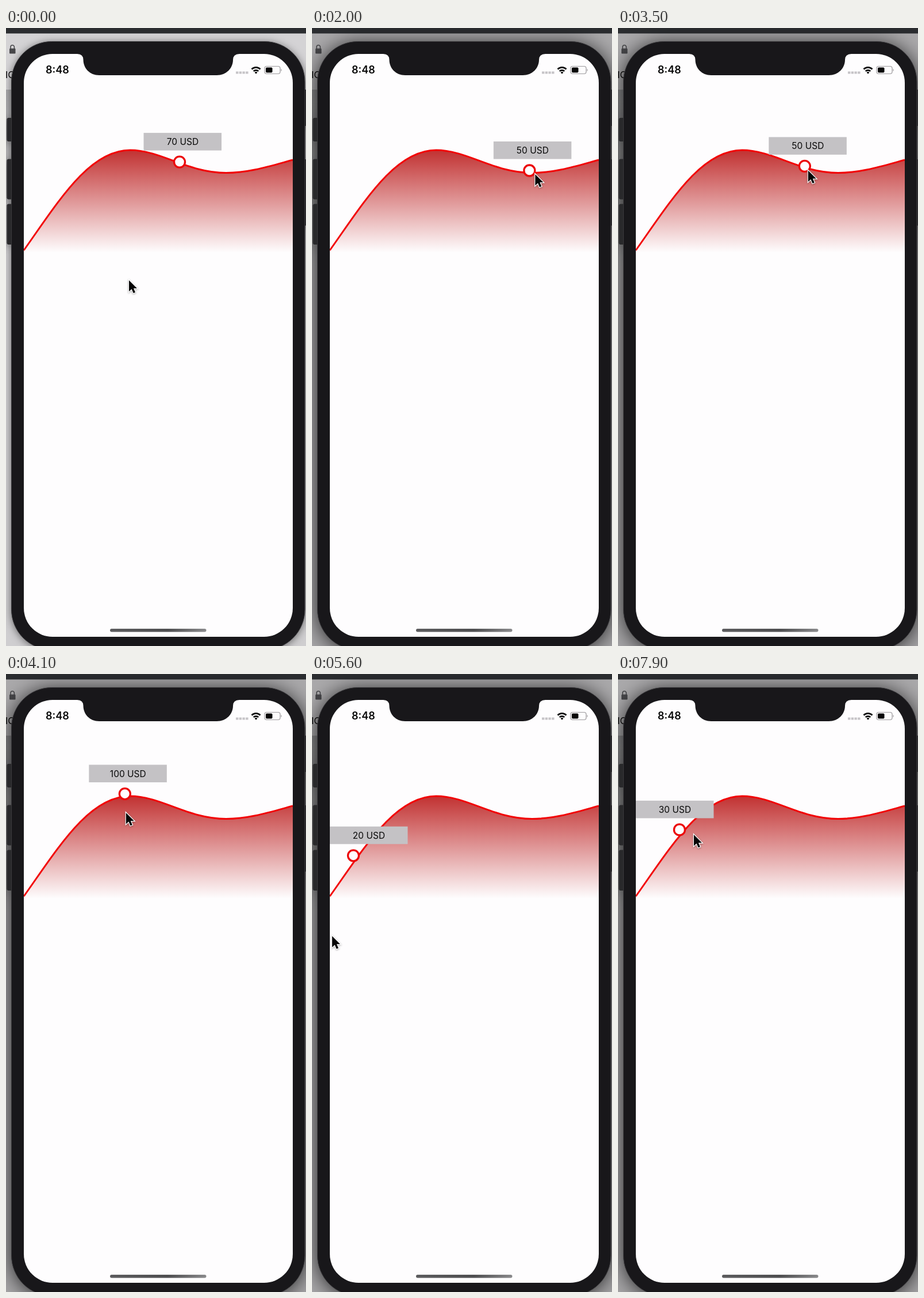
Recreate the animation shown at these times as an HTML page. Size 522 by 1073 pixels, loop 8 s.

```html
<!DOCTYPE html>
<html lang="en">
<head>
<meta charset="utf-8">
<title>Chart drag</title>
<style>
  html, body { margin: 0; width: 100%; height: 100%; overflow: hidden; }
  svg { display: block; width: 100vw; height: 100vh; }
  text { font-family: Inter, "Open Sans", sans-serif; fill: #080808; }
  #shade { opacity: 0; }
  #phone { filter: drop-shadow(0 2px 7px rgba(0, 0, 0, .5)); }
  .focus #shade { opacity: .2; }
  .focus #phone { filter: drop-shadow(0 3px 17px rgba(0, 0, 0, .75)); }
  #pointer { filter: drop-shadow(0 1.5px 1.5px rgba(0, 0, 0, .35)); }
</style>
</head>
<body>
<svg id="stage" viewBox="0 0 522 1073">
  <defs>
    <linearGradient id="area" gradientUnits="userSpaceOnUse" x1="0" y1="211" x2="0" y2="390">
      <stop offset="0" stop-color="#c13030"/>
      <stop offset="1" stop-color="#c13030" stop-opacity="0"/>
    </linearGradient>
    <linearGradient id="page" x2="0" y2="1">
      <stop offset="0" stop-color="#a9a9ab"/>
      <stop offset=".3" stop-color="#cfced0"/>
    </linearGradient>
    <linearGradient id="home">
      <stop offset="0" stop-color="#5c5c5e"/>
      <stop offset=".6" stop-color="#4e4e50"/>
      <stop offset="1" stop-color="#8a8a8c"/>
    </linearGradient>
    <clipPath id="screen"><rect x="31" y="45" width="468" height="1012" rx="50"/></clipPath>
  </defs>

  <!-- desktop behind the phone -->
  <rect y="107" width="522" height="966" fill="url(#page)"/>
  <rect width="522" height="107" fill="#d4d3d5"/>
  <rect id="shade" width="522" height="1073"/>
  <rect width="522" height="9.5" fill="#2b2d30"/>
  <path d="M8 36v-3a3.2 3.2 0 0 1 6.4 0v3" fill="none" stroke="#47474a" stroke-width="1.6"/>
  <rect x="6" y="35.5" width="10.5" height="9" rx="1.2" fill="#47474a"/>
  <text x="-1" y="87" font-size="16">IC</text>

  <!-- phone -->
  <g id="phone">
    <g fill="#29292b">
      <rect x="1.5" y="156" width="14" height="41" rx="3"/>
      <rect x="1.5" y="227.5" width="14" height="70" rx="3"/>
      <rect x="1.5" y="305.5" width="14" height="70.5" rx="3"/>
      <rect x="514" y="107" width="12" height="63"/>
      <rect x="514" y="228" width="12" height="115"/>
    </g>
    <rect x="9.5" y="23.5" width="510.5" height="1056" rx="70" fill="#18171a" stroke="#3a393c"/>
  </g>
  <rect x="31" y="45" width="468" height="1012" rx="50" fill="#fefdfe"/>
  <path d="M124 44H406V45Q395 45.5 395 55C395 70 383 82 367 82H162C146 82 134.5 70 134.5 55Q134.5 45.5 124 45Z" fill="#18171a"/>

  <!-- status bar -->
  <text x="69" y="79.3" font-size="18" font-weight="600">8:48</text>
  <path d="M400 77.5h22" stroke="#c6c4c7" stroke-width="4" stroke-dasharray="4.4 1.3"/>
  <g fill="none" stroke="#080808" stroke-width="2.7">
    <path d="M427.5 71.5a10.5 10.5 0 0 1 15 0M430.8 75a6 6 0 0 1 8.4 0"/>
    <path d="M433 77.2L435 79.2 437 77.2Q435 75.8 433 77.2Z" fill="#080808" stroke-width="1"/>
  </g>
  <rect x="450" y="66.5" width="27" height="13" rx="3.5" fill="none" stroke="#9b999c" stroke-width="1.2"/>
  <rect x="452" y="68.5" width="11.5" height="9" rx="1.8" fill="#080808"/>
  <path d="M478.5 70.5q2.5 2.5 0 5z" fill="#9b999c"/>
  <rect x="181" y="1043" width="167.5" height="5.5" rx="2.75" fill="url(#home)"/>

  <!-- chart -->
  <g clip-path="url(#screen)">
    <path id="fill" fill="url(#area)"/>
    <path id="line" fill="none" stroke="#f20507" stroke-width="3"
      d="M31 386C92 300 145 212 216 212C270 212 316 251.5 383 251.5C424 251.5 462 239 499 229"/>
    <g id="label">
      <rect width="135.5" height="30.5" fill="#c4c2c5"/>
      <text id="price" x="68" y="21" font-size="15.5" text-anchor="middle"></text>
    </g>
    <circle id="dot" r="9.5" fill="#fefdfe" stroke="#ec0709" stroke-width="3.3"/>
  </g>
  <path id="pointer" d="M0 0V19.5L4.6 15.3 7.6 22.3 11 20.9 8 14H14Z"
    fill="#050505" stroke="#fff" stroke-width="2.4" paint-order="stroke"/>
</svg>

<script>
const el = id => document.getElementById(id);
const place = (id, x, y) => el(id).setAttribute("transform", `translate(${x} ${y})`);
const LOOP = 8000, STEP = 100, FOCUS_TIME = 1100;
const PRICES = [20, 30, 50, 70, 100];

const line = el("line");
const length = line.getTotalLength();
el("fill").setAttribute("d", line.getAttribute("d") + "V390H31Z");

function curveY(x) {
  let low = 0, high = length;
  for (let i = 0; i < 18; i++) {
    const mid = (low + high) / 2;
    if (line.getPointAtLength(mid).x < x) low = mid; else high = mid;
  }
  return line.getPointAtLength(low).y;
}

function draw(now) {
  const time = Math.floor((now % LOOP) / STEP) * STEP;
  const ease = (from, to) => {
    const p = Math.min(1, Math.max(0, (time - from) / (to - from)));
    return p * p * (3 - 2 * p);
  };

  // phases of the gesture
  const approach = ease(100, 700), press = ease(1100, 2000);
  const dragRight = ease(1350, 2520), dragLeft = ease(2520, 5220);
  const drift = ease(2900, 4100), release = ease(4100, 5600);
  const comeBack = ease(5800, 7300), dragAgain = ease(7600, 8200);

  const x = 302 + 131 * dragRight - 361 * dragLeft + 70 * dragAgain;
  const y = curveY(x + 6) - 4;
  const lead = -88 + 95 * approach + 3 * press - 8 * drift
    - 39 * release + 37 * comeBack + 50 * dragAgain;
  const pointerY = 438 - 197 * approach + 13 * press - 13 * drift
    + 214 * release - 137 * comeBack - 78 * dragAgain;

  place("dot", x, y);
  place("label", x < 112 ? 31 : Math.min(x - 62.5, 363.5), y - 50.5);
  place("pointer", x + lead, pointerY);

  const level = Math.floor((316 - y) / 26);
  el("price").textContent = PRICES[Math.min(4, Math.max(0, level))] + " USD";
  el("stage").classList.toggle("focus", time >= FOCUS_TIME);
}

const start = performance.now();
function tick() {
  draw(performance.now() - start);
  requestAnimationFrame(tick);
}
tick();
</script>
</body>
</html>
```
